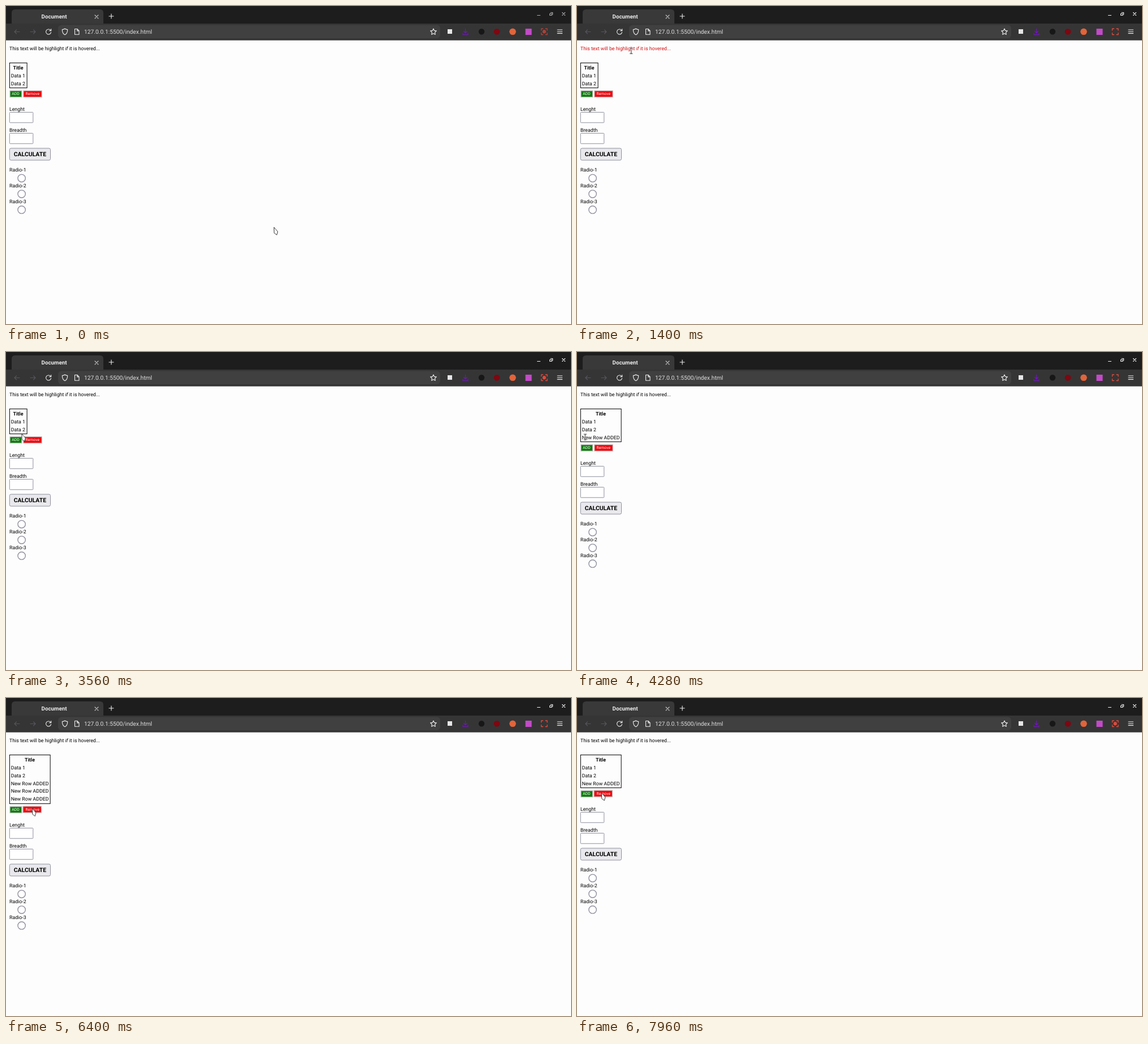
An HTML page that plays this animation: 998x561 px, repeating every 8 s.

```html
<!DOCTYPE html>
<html lang="en">
<head>
<meta charset="utf-8">
<title>Document</title>
<style>
@property --rows { syntax: "<integer>"; inherits: true; initial-value: 0; }
@property --add { syntax: "<integer>"; inherits: true; initial-value: 0; }
@property --remove { syntax: "<integer>"; inherits: true; initial-value: 0; }
@property --beam { syntax: "<integer>"; inherits: true; initial-value: 0; }

html, body { margin: 0; width: 100%; height: 100%; overflow: hidden; background: #fdfdfe; }
svg {
  display: block; width: 998px; height: 561px;
  font: 8.77px Roboto, sans-serif; text-rendering: geometricPrecision;
  animation: rows 8s step-end infinite, add 8s step-end infinite,
    remove 8s step-end infinite, beam 8s step-end infinite;
}
.line { fill: none; stroke: #f0f0f2; stroke-width: 1.1; stroke-linecap: round; stroke-linejoin: round; }
.off { stroke: #55555e; }
.middle { text-anchor: middle; }
.bold { font-weight: 700; }
.field { fill: #fff; stroke: #8f8f9d; }
.small { font-size: 6.85px; fill: #fff; }

.window { animation: focus 8s step-end infinite; }
.dot { animation: blink 1s step-end infinite; }
.hover-text { animation: highlight 8s step-end infinite; }

.table { fill: none; stroke: #000;
  width: calc(30.7px + min(var(--rows), 1) * 41px);
  height: calc(44px + var(--rows) * 14px); }
.title { transform: translateX(calc(min(var(--rows), 1) * 20.5px)); }
.row { opacity: clamp(0, var(--rows) - var(--n), 1); }
.below { transform: translateY(calc(var(--rows) * 14px)); }
.add { transform: translate(calc(var(--add) * -.8px), calc(var(--add) * -.5px)); }
.remove { transform: translate(calc(var(--remove) * -.8px), calc(var(--remove) * -.5px)); }

.cursor { animation: move 8s linear infinite; }
.arrow { opacity: calc(1 - var(--beam)); }
.beam { opacity: var(--beam); }

@keyframes rows {
  0% { --rows: 0; } 50% { --rows: 1; } 60.5% { --rows: 2; } 71.5% { --rows: 3; }
  83% { --rows: 2; } 92.5%, 100% { --rows: 1; }
}
@keyframes add {
  0%, 50%, 60.5%, 71.5%, 100% { --add: 0; }
  45.5%, 56%, 64.5% { --add: 1; }
}
@keyframes remove {
  0%, 83%, 92.5% { --remove: 0; }
  77.5%, 88%, 98%, 100% { --remove: 1; }
}
@keyframes beam {
  0%, 26.5%, 55.5%, 64%, 74.5%, 100% { --beam: 0; }
  11%, 50%, 60.5%, 71.5% { --beam: 1; }
}
@keyframes focus { 0% { opacity: .68; } 5%, 100% { opacity: 1; } }
@keyframes blink { 0% { opacity: 1; } 4% { opacity: 0; } 50%, 100% { opacity: 1; } }
@keyframes highlight { 0%, 26.5%, 100% { fill: #000; } 11% { fill: #d30d0d; } }
@keyframes move {
  0%, 2% { transform: translate(473px, 390px); }
  6% { transform: translate(290px, 245px); }
  11% { transform: translate(106px, 80px); }
  13%, 17.5% { transform: translate(95.7px, 79px); }
  24% { transform: translate(92px, 77px); }
  28% { transform: translate(102px, 92px); }
  32%, 35% { transform: translate(104px, 101px); }
  41% { transform: translate(58px, 129px); }
  46%, 53.5% { transform: translate(14.5px, 150px); }
  57%, 62% { transform: translate(14.5px, 168px); }
  65.5%, 72.5% { transform: translate(14.5px, 182px); }
  75% { transform: translate(22px, 191px); }
  78%, 85% { transform: translate(46px, 194.5px); }
  89%, 95% { transform: translate(44px, 181px); }
  98.5%, 100% { transform: translate(43px, 167px); }
}
</style>
</head>
<body>
<svg viewBox="0 0 998 561">
  <rect width="998" height="561" fill="#fdfdfe"/>

  <!-- Browser chrome -->
  <rect width="998" height="31" fill="#1d1d1d"/>
  <rect y="31" width="998" height="29.6" fill="#353535"/>
  <path d="M10 31V12q0-6 6-6h150q6 0 6 6v19z" fill="#393939"/>
  <rect x="92" y="33.5" width="675" height="23.5" rx="6" fill="#404040"/>
  <text class="middle bold" x="85" y="22" font-size="9.75" fill="#ececee">Document</text>
  <text x="138" y="48.8" font-size="10.25" fill="#dedee0">127.0.0.1:5500/index.html</text>
  <path class="line" stroke-width=".9" opacity=".75" d="M157 16l6 6m0-6l-6 6"/>
  <path class="line" d="M182 18h8m-4-4v8"/>
  <g class="window">
    <path class="line" d="M938.5 16.5h5M982.5 11.5l5 5m0-5l-5 5M960.5 13.5h3.5v3h-3.5zM962 11.5h3.6v3.4"/>
    <path class="line" style="stroke:#e34b3c;stroke-width:1.3"
      d="M945.5 43v-3h3M953 40h3v3M956 47.500v3h-3M948.500 50.500h-3v-3"/>
    <circle class="dot" cx="950.7" cy="45.2" r="3.1" fill="#dc4b3d"/>
  </g>
  <path class="line off" d="M24 45.500h-9m3.500-3.500l-3.500 3.500 3.500 3.500M43 45.500h9m-3.500-3.500l3.500 3.500-3.500 3.500"/>
  <path class="line" d="M79 43.300a4.500 4.500 0 1 0 .5 3M79.700 40.500v3.300h-3.300"/>
  <path class="line" d="M104 40q2 1.500 4.700 1.500 0 7-4.700 9.300-4.700-2.300-4.700-9.300 2.700 0 4.700-1.500z"/>
  <path class="line" d="M121.500 40.500h4.300l3.200 3.200v6.600h-7.500zM125.800 40.700v3.200h3"/>
  <path class="line" d="M755 40l1.600 3.400 3.700.5-2.700 2.600.7 3.700-3.300-1.800-3.300 1.800.7-3.700-2.700-2.600 3.700-.5z"/>
  <rect x="780" y="41" width="8" height="8" fill="#e6e6e8"/>
  <path class="line" style="stroke:#7414c4" d="M811.500 40v7.500m-3-3l3 3 3-3M807 48v2.500h9v-2.500"/>
  <circle cx="840" cy="45.300" r="5.200" fill="#171717"/>
  <circle cx="867" cy="45.300" r="5.400" fill="#800610"/>
  <circle cx="895" cy="45.300" r="5.800" fill="#e2643a"/>
  <rect x="917.500" y="40" width="11" height="11" fill="#c34ac8"/>
  <path class="line" d="M974 42h8.500m-8.500 3.200h8.500m-8.500 3.200h8.500"/>

  <!-- Page -->
  <text class="hover-text" x="6" y="78">This text will be highlight <tspan font-style="italic">if</tspan> it is hovered...</text>
  <rect class="table" x="6.400" y="100.400"/>
  <text class="title middle bold" x="21.500" y="111.600">Title</text>
  <text x="8.700" y="125.600">Data 1</text>
  <text x="8.700" y="139.600">Data 2</text>
  <text class="row" style="--n:0" x="8.700" y="153.500">New Row ADDED</text>
  <text class="row" style="--n:1" x="8.700" y="167.400">New Row ADDED</text>
  <text class="row" style="--n:2" x="8.700" y="181.300">New Row ADDED</text>

  <g class="below">
    <g class="add">
      <rect x="6.500" y="149" width="21.800" height="12.300" fill="#b4b4b4"/>
      <rect x="7.700" y="150.300" width="19.300" height="9.700" fill="#087b08"/>
    </g>
    <g class="remove">
      <rect x="30.300" y="149" width="33.400" height="12.300" fill="#c6aaaa"/>
      <rect x="31.500" y="150.300" width="31" height="9.700" fill="#f00008"/>
    </g>
    <text class="small middle" x="17" y="157.300">ADD</text>
    <text class="small middle" x="46.800" y="157.300">Remove</text>

    <text x="6" y="185">Lenght</text>
    <rect class="field" x="6.300" y="187.500" width="41.500" height="18.300" rx="1"/>
    <text x="6" y="222">Breadth</text>
    <rect class="field" x="6.300" y="224.500" width="41.500" height="18.300" rx="1"/>
    <rect class="field" style="fill:#e9e9ed" x="6.300" y="251" width="72.200" height="21" rx="2.500"/>
    <text class="middle bold" x="42.400" y="265.200" font-size="10.450">CALCULATE</text>

    <text x="6" y="292">Radio-1</text>
    <text x="6" y="320">Radio-2</text>
    <text x="6" y="347.800">Radio-3</text>
    <g class="field" stroke-width="1.400">
      <circle cx="27.600" cy="303.800" r="6.700"/>
      <circle cx="27.600" cy="331.600" r="6.700"/>
      <circle cx="27.600" cy="359.400" r="6.700"/>
    </g>
  </g>

  <g class="cursor">
    <path class="arrow" d="M.3.3L.7 10.500 5.300 13.800 7 8z" fill="#fff" stroke="#222" stroke-width=".9" stroke-linejoin="round"/>
    <g class="beam" fill="none">
      <path d="M-2.500-5h5M-2.500 5h5M0-5v10" stroke="#fff" stroke-width="2.600"/>
      <path d="M-2.500-5h5M-2.500 5h5M0-5v10" stroke="#222"/>
    </g>
  </g>
</svg>
</body>
</html>
```
